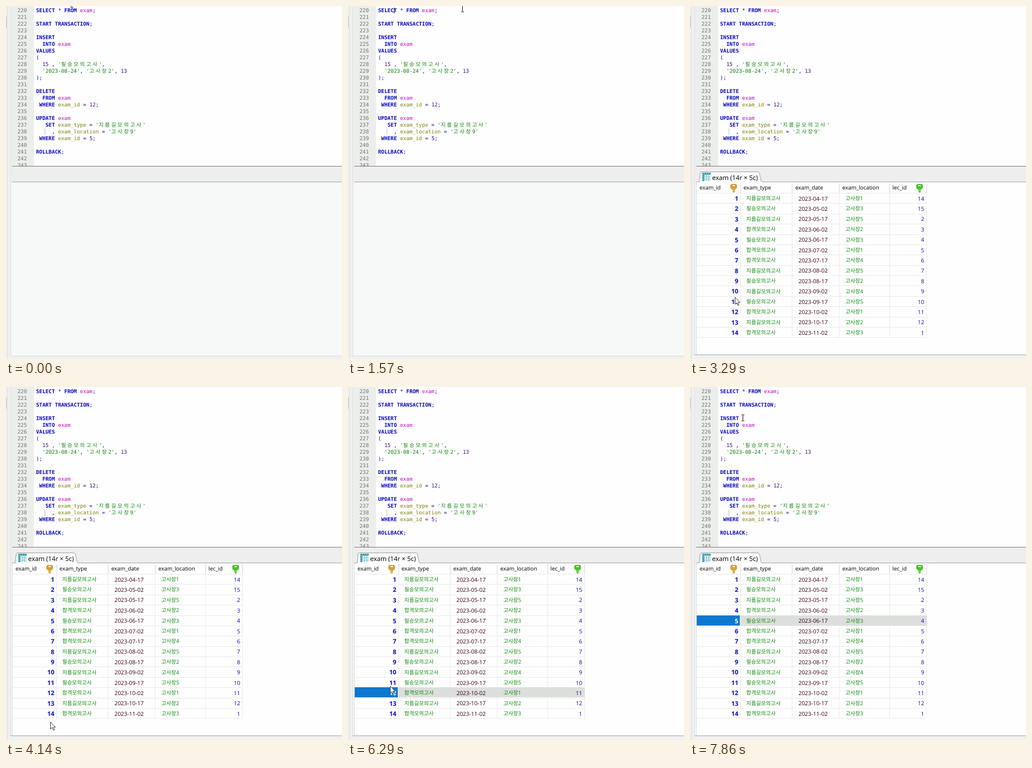
These frames come from a looping animation (600 px wide and 629 px high, 8000 ms). An HTML page:

```html
<!DOCTYPE html>
<html lang="ko">
<head>
<meta charset="utf-8">
<title>SQL editor</title>
<style>
html, body { margin: 0; width: 100%; height: 100%; overflow: hidden; background: #eff0ef; }
svg { display: block; text-rendering: geometricPrecision; }
rect { shape-rendering: crispEdges; }
text { white-space: pre; font: 10px "Open Sans", "Noto Sans CJK KR", "Noto Sans CJK", sans-serif; fill: #000; }
.code text { font: 9.3px "DejaVu Sans Mono", "Noto Sans CJK KR", "Noto Sans CJK", monospace; fill: #0808a0; }
.code .line { fill: #707070; }
.key { font-weight: 700; fill: #0808c0; }
.table { fill: #c408c4; }
.col { fill: #808010; }
.num { fill: #440870; }
.str { fill: #088408; }
.wide { letter-spacing: 2.64px; }
.head { font-size: 9.8px; }
.id { font-size: 11px; font-weight: 700; fill: #0808c0; text-anchor: end; }
.id.on { fill: #fff; }
.ko { font-size: 9.5px; fill: #088808; }
.date { fill: #380010; }
.lec { fill: #0808b8; text-anchor: end; }
.tab { font-size: 11.5px; }
</style>
</head>
<body>
<svg width="600" height="629" viewBox="0 0 600 629">
  <clipPath id="editor"><rect width="600" height="285"/></clipPath>
  <rect width="600" height="629" fill="#eff0ef"/>
  <rect x="2" width="1" height="629" fill="#dcdedc"/>
  <rect y="19" width="1" height="20" fill="#bbb"/>
  <rect x="8" width="1" height="624" fill="#dcdedc"/>
  <rect x="11" width="39" height="285" fill="#eceeec"/>
  <rect x="50" width="550" height="285" fill="#fefefe"/>
  <rect x="69" y="218" width="1" height="12" fill="#c4c4c4"/>
  <g id="code" class="code" clip-path="url(#editor)"></g>
  <rect x="11" y="285" width="589" height="1" fill="#7c7c7c"/>
  <rect x="11" y="286" width="589" height="27" fill="#eeeeee"/>
  <rect x="9" y="314" width="591" height="309" fill="#f6f9f7"/>
  <rect x="11" y="313" width="589" height="1" fill="#a4a4a4"/>
  <rect x="8" y="623" width="592" height="1" fill="#dcdedc"/>
  <g id="result"></g>
  <rect id="caret" x="82" y="3" width="1" height="10" fill="#000"/>
  <path id="beam" d="M-2.5 -5.5H-.8L0 -5L.8 -5.5H2.5M0 -5V5M-2.5 5.5H-.8L0 5L.8 5.5H2.5" fill="none" stroke="#111"/>
  <path id="arrow" d="M0 0V12.5L2.9 9.8L5 14.6L7 13.7L5 9.1H8.8Z" fill="#fff" stroke="#222" stroke-width=".9"/>
</svg>
<script>
const $ = id => document.getElementById(id);
const rect = (x, y, w, h, fill, more = '') =>
  `<rect x="${x}" y="${y}" width="${w}" height="${h}" fill="${fill}" ${more}/>`;
const text = (x, y, s, cls = '') => `<text x="${x}" y="${y}" class="${cls}">${s}</text>`;

// Editor
const sql = `SELECT * FROM exam;

START TRANSACTION;

INSERT
  INTO exam
VALUES
(
  15 , '필승모의고사',
  '2023-08-24', '고사장2', 13
);

DELETE
  FROM exam
 WHERE exam_id = 12;

UPDATE exam
   SET exam_type = '지름길모의고사'
     , exam_location = '고사장9'
 WHERE exam_id = 5;

ROLLBACK;

`;
const span = (cls, s) => `<tspan class="${cls}">${s}</tspan>`;
const paint = line => line.replace(/'[^']*'|[A-Z]+|exam_\w+|exam|\d+/g, s =>
  s[0] === "'" ? span('str', s.replace(/[가-힣]+/g, k => span('wide', k))) :
  /[A-Z]/.test(s) ? span('key', s) :
  s === 'exam' ? span('table', s) :
  /\d/.test(s) ? span('num', s) : span('col', s));

$('code').innerHTML = sql.split('\n').map((line, i) => {
  const y = 11.3 + 12 * i;
  return text(20.5, y, 220 + i, 'line') + text(53.7, y, paint(line));
}).join('');

// Result grid
const TOP = 334, ROW = 18.385, ROWS = 14;
const rowY = i => Math.round(TOP + ROW * i) - 1;
const kinds = { j: '지름길', p: '필승', h: '합격' };
const kindOrder = 'jpjhphhjpjphjh';
const rooms = '13523145245123';
const keyIcon = (x, fill) => `<g transform="translate(${x} 317)">
  <path d="M2 0H10L12 2V7L9 10H8V14L6 16L4 14V10H3L0 7V2Z" fill="${fill}"/>
  <rect x="4" y="2" width="4" height="2" fill="#fff"/>
  <path d="M6 9V14" stroke="#fff" stroke-opacity=".45"/></g>`;

function grid() {
  let out = rect(11, 314, 589, 307, '#fefefe') + rect(11, 314, 1, 307, '#dcdcdc') +
    rect(8, 621, 592, 1, '#a8a8a8') + rect(8, 622, 592, 7, '#eff0ef');
  out += `<path d="M16.5 313.5L18 298Q18.5 295.5 21 295.5H121Q123 295.5 124 298L127.5 313.5" fill="#f9faf9" stroke="#a0a0a0"/>`;
  out += rect(17, 313, 111, 1, '#fefefe');
  out += rect(22, 297, 15, 15, '#3d9aa6') + rect(26, 301, 11, 11, '#e4f5f5');
  for (const k of [0, 4, 8])
    out += rect(25 + k, 297, 1, 15, '#7cc4cc') + rect(22, 300 + k, 15, 1, '#7cc4cc');
  out += text(39.5, 309.5, 'exam (14r × 5c)', 'tab');

  [[17, 'exam_id'], [95.5, 'exam_type'], [188, 'exam_date'], [272, 'exam_location'], [361.5, 'lec_id']]
    .forEach(([x, s]) => out += text(x, 327, s, 'head'));
  out += keyIcon(72, '#d8a03c') + keyIcon(404, '#4cc42c');

  for (let i = 0; i <= ROWS; i++) out += rect(12, rowY(i), 411, 1, '#ebebeb');
  for (const x of [90, 182, 266, 356, 422])
    out += rect(x, 316, 1, 17, '#d6d6d6') + rect(x, TOP, 1, rowY(ROWS) - TOP, '#ebebeb');
  out += '<g id="pick">' + rect(90, 0, 333, 18, '#dcdfdc') + rect(12, 0, 77, 18, '#0c78d0') + '</g>';

  for (let i = 0; i < ROWS; i++) {
    const y = TOP + ROW * i + 12.7;
    const month = String(4 + (i + 1 >> 1)).padStart(2, '0');
    out += text(86.3, y + .3, i + 1, 'id') +
      text(100.5, y - .6, kinds[kindOrder[i]] + '모의고사', 'ko') +
      text(193.7, y, `2023-${month}-${i % 2 ? '02' : '17'}`, 'date') +
      text(277.5, y - .6, '고사장' + rooms[i], 'ko') +
      text(418.3, y, i < 2 ? 14 + i : i === 13 ? 1 : i, 'lec');
  }
  return out;
}
$('result').innerHTML = grid();
const ids = document.querySelectorAll('.id');

// Pointer path: step, x, y (seven steps a second)
const path = [
  [0, 117, -3], [3, 90, 6], [4, 82, 6], [6, 82, 6], [8, 204, 5], [12, 204, 5],
  [15, 82, 6], [18, 82, 6], [24, 80, 560], [27, 79, 597], [34, 79, 597],
  [38, 74, 547], [43, 74, 547], [48, 87, 415], [50, 87, 415], [55, 94, 55], [56, 94, 55]
];
const ease = u => u * u * (3 - 2 * u);

function pointer(step) {
  const n = path.findIndex(p => p[0] > step);
  const [a, x, y] = path[n - 1], [b, x2, y2] = path[n];
  const u = ease((step - a) / (b - a));
  return [Math.round(x + (x2 - x) * u) + .5, Math.round(y + (y2 - y) * u)];
}

const show = (id, on) => $(id).style.display = on ? '' : 'none';

function draw(now) {
  const step = Math.min(55, Math.floor((now % 8000) * 7 / 1000 + .03));
  const [x, y] = pointer(step);
  const inEditor = y < 285;
  show('beam', inEditor);
  show('arrow', !inEditor);
  $(inEditor ? 'beam' : 'arrow').setAttribute('transform', `translate(${x} ${y})`);
  show('caret', step > 4 && step < 29 && !((step < 17 ? step - 3 : step - 17) & 4));
  show('result', step >= 17);

  const row = step >= 50 ? 4 : step >= 42 ? 11 : -1;
  show('pick', row >= 0);
  $('pick').setAttribute('transform', `translate(0 ${rowY(row)})`);
  ids.forEach((el, i) => el.classList.toggle('on', i === row));
  requestAnimationFrame(() => draw(performance.now() - start));
}
const start = performance.now();
draw(0);
</script>
</body>
</html>
```
